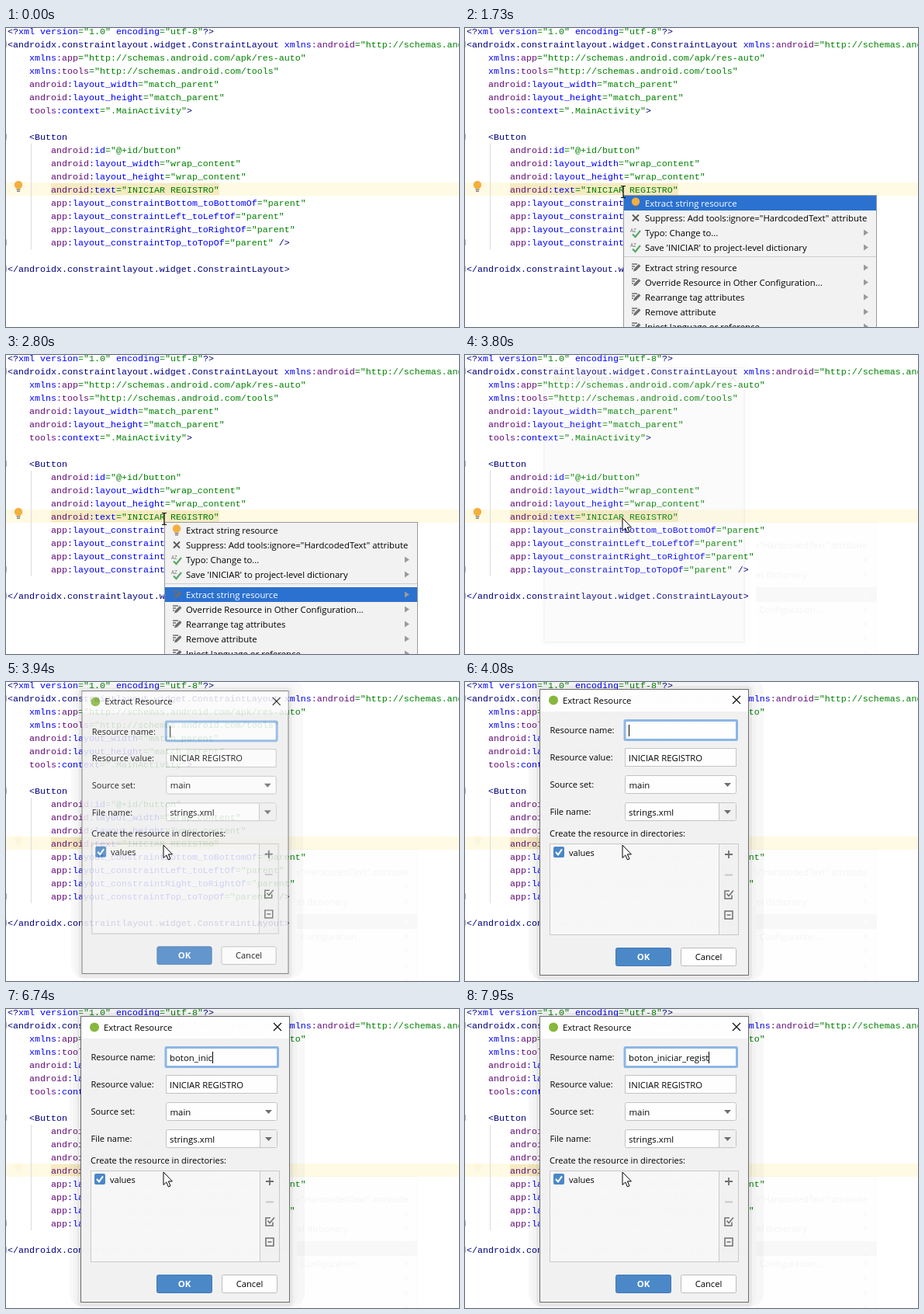
Animation of 584 by 385 pixels, one loop 8000 ms. Source, as an HTML page:

```html
<!DOCTYPE html>
<html lang="es">
<head>
<meta charset="utf-8">
<title>Extract string resource</title>
<style>
html, body { margin: 0; width: 100%; height: 100%; overflow: hidden; background: #fff; }
svg { display: block; }
text { white-space: pre; }
.code { font: 11.667px "Liberation Mono", "Courier New", monospace; }
.ui { font-family: "Open Sans", "Noto Sans", sans-serif; }
#ghost { filter: grayscale(1); }
</style>
</head>
<body>
<svg id="stage" width="584" height="385" viewBox="0 0 584 385"></svg>
<script>
const LOOP = 8000;
const stage = document.getElementById('stage');
const NAVY = '#000080', PURPLE = '#660e7a', BLUE = '#0000ff', GREEN = '#008000';

// --- markup helpers
const esc = s => s.replace(/&/g, '&amp;').replace(/</g, '&lt;').replace(/>/g, '&gt;');
const span = (s, fill) => `<tspan fill="${fill}">${esc(s)}</tspan>`;
const rect = (x, y, w, h, fill, more = '') =>
  `<rect x="${x}" y="${y}" width="${w}" height="${h}" fill="${fill}" ${more}/>`;
const line = (d, stroke, w = 1, more = '') =>
  `<path d="${d}" fill="none" stroke="${stroke}" stroke-width="${w}" ${more}/>`;
const shape = (d, fill) => `<path d="${d}" fill="${fill}"/>`;
const label = (x, y, s, size = 11.1, more = '') =>
  `<text class="ui" x="${x}" y="${y}" font-size="${size}" ${more}>${esc(s)}</text>`;
const box = (x, y, w, h, fill, stroke, r = 0) =>
  rect(x + .5, y + .5, w - 1, h - 1, fill, `stroke="${stroke}" rx="${r}"`);

// --- editor
const lines = [
  [0, '<?xml version="1.0" encoding="utf-8"?>'],
  [0, '<androidx.constraintlayout.widget.ConstraintLayout xmlns:android="http://schemas.android.com/apk/res/android"'],
  [4, 'xmlns:app="http://schemas.android.com/apk/res-auto"'],
  [4, 'xmlns:tools="http://schemas.android.com/tools"'],
  [4, 'android:layout_width="match_parent"'],
  [4, 'android:layout_height="match_parent"'],
  [4, 'tools:context=".MainActivity">'],
  [0, ''],
  [4, '<Button'],
  [8, 'android:id="@+id/button"'],
  [8, 'android:layout_width="wrap_content"'],
  [8, 'android:layout_height="wrap_content"'],
  [8, 'android:text="INICIAR REGISTRO"'],
  [8, 'app:layout_constraintBottom_toBottomOf="parent"'],
  [8, 'app:layout_constraintLeft_toLeftOf="parent"'],
  [8, 'app:layout_constraintRight_toRightOf="parent"'],
  [8, 'app:layout_constraintTop_toTopOf="parent" />'],
  [0, ''],
  [0, '</androidx.constraintlayout.widget.ConstraintLayout>']
];

function paint(s) {
  const parts = s.match(/="[^"]*"|xmlns|<\?|\?>|:\w+|<\/?[\w.]+|\/?>|\w+|\s+|./g) || [];
  let prev = '';
  return parts.map(p => {
    let fill = BLUE;
    if (p[0] === '=') fill = GREEN;
    else if (/^[<>\/?]/.test(p)) fill = NAVY;
    else if (p[0] === ':') fill = prev === 'xmlns' ? PURPLE : BLUE;
    else if (/^(android|app|tools)$/.test(p)) fill = PURPLE;
    prev = p;
    return span(p, fill);
  }).join('');
}

const codeText = lines.map(([indent, s], i) =>
  `<text class="code" x="${2 + indent * 7}" y="${8 + 17 * i}">${paint(s)}</text>`).join('');
const folds = [21, 140, 276, 310].map(y => line(`M0 ${y - 3.5}h.5v7h-.5`, '#b0b0b0')).join('');

const bulb = (x, y) =>
  `<circle cx="${x}" cy="${y - 2}" r="5.2" fill="#f4af3d"/>` +
  rect(x - 2.5, y + 3.5, 5, 1.2, '#6e6e6e') + rect(x - 2, y + 5.7, 4, 1.2, '#6e6e6e');

// --- popup menu
const check = (x, y) => label(x - 7, y - 1, 'AZ', 6.5, 'fill="#6e6e6e"') +
  line(`M${x - 4} ${y + 2}l3.5 3.5l6.5 -8`, '#59a869', 2.2);
const pencil = (x, y) =>
  line(`M${x - 5} ${y - 4.5}h7M${x - 5} ${y - 1.5}h4M${x - 5} ${y + 1.5}h2`, '#6e6e6e', 1.3) +
  shape(`M${x - 3} ${y + 5}l1 -3.5l6 -6l2.5 2.5l-6 6z`, '#6e6e6e');
const cross = (x, y) =>
  line(`M${x - 4} ${y - 4}l8 8m0 -8l-8 8`, '#595959', 1.8);

const items = [
  ['Extract string resource', bulb],
  ['Suppress: Add tools:ignore="HardcodedText" attribute', cross],
  ['Typo: Change to...', check],
  ["Save 'INICIAR' to project-level dictionary", check],
  ['Extract string resource', pencil],
  ['Override Resource in Other Configuration...', pencil],
  ['Rearrange tag attributes', pencil],
  ['Remove attribute', pencil],
  ['Inject language or reference', pencil]
];
const rowTop = i => i < 4 ? 216 + 19 * i : 223 + 19 * i;
const menu = box(204, 215, 327, 190, '#f2f2f2', '#9a9a9a') +
  line('M205 294.5h325', '#cdcdcd') +
  rect(205, 216, 325, 19, '#2b71cf', 'id="pick"') +
  items.map(([s, icon], i) => {
    const y = rowTop(i) + 9.5;
    return icon(220, y) + label(232, y + 4.2, s, 11.35, 'data-row') +
      (i > 1 ? shape(`M514 ${y - 4}l6 4l-6 4z`, '#9a9a9a') : '');
  }).join('');

// --- dialog
const arrowDown = (x, y) => shape(`M${x - 4.5} ${y - 2}h9l-4.5 5z`, '#6e6e6e');
const controls =
  label(109.5, 66.3, 'Resource name:') + label(109.5, 101.3, 'Resource value:') +
  label(109.5, 136.3, 'Source set:') + label(109.5, 171.3, 'File name:') +
  label(109, 199.3, 'Create the resource in directories:') +
  rect(206, 49.5, 144.5, 25, '#fff', 'stroke="#8bb6e6" stroke-width="3" rx="1"') +
  `<text class="ui" id="name" x="211" y="66.5" font-size="11.4"></text>` +
  rect(211, 55, 1, 15, '#000', 'id="caret"') +
  box(206, 85, 144, 24, '#fff', '#c4c4c4') + label(211, 101.5, 'INICIAR REGISTRO', 11.3) +
  box(206, 120, 144, 24, '#fff', '#c4c4c4', 2) + label(211.5, 136.5, 'main', 11.4) + arrowDown(338.5, 132) +
  box(206, 155, 144, 24, '#fff', '#c4c4c4', 2) + label(211, 171.5, 'strings.xml', 11.4) +
  rect(328, 156, 21, 22, '#f2f2f2') + line('M327.5 156v22', '#c4c4c4') + arrowDown(338.5, 167) +
  box(109, 208, 244, 118, '#f2f2f2', '#c9c9c9') +
  box(109, 208, 219, 118, '#f8f8f8', '#c9c9c9') +
  rect(114, 212, 14, 14, '#4a87c8', 'rx="2"') + line('M117 219l3 3.3l5 -7', '#fff', 2) +
  label(134, 223.5, 'values') +
  line('M340 217v10m-5 -5h10', '#6e6e6e', 1.8) + line('M335 248.5h10', '#c2c2c2', 1.8) +
  line('M344 274.5v4.5h-9v-10h6M337.5 272.5l2.5 3l6 -7', '#6e6e6e', 1.5) +
  line('M335 295h10v10h-10zM337.5 300h5', '#6e6e6e', 1.5) +
  box(194, 342, 72, 24, '#4a87c8', '#3f78b4', 2) +
  label(230, 358.3, 'OK', 11.4, 'fill="#fff" font-weight="700" text-anchor="middle"') +
  box(278, 342, 72, 24, '#fff', '#bcbcbc', 2) +
  label(314, 358.2, 'Cancel', 11.2, 'text-anchor="middle"');

const dialog =
  `<g id="shade">` +
  rect(82, -6, 303, 390, '#000', 'rx="18" opacity=".03"') +
  rect(87, 0, 288, 385, '#000', 'rx="12" opacity=".02"') +
  rect(92, 5, 278, 378, '#000', 'rx="6" opacity=".05"') + `</g>` +
  `<g id="panel">` +
  box(96, 9, 270, 369, '#f2f2f2', '#6a6a6a') +
  rect(97, 10, 268, 28, '#fff') +
  `<circle cx="114" cy="23.5" r="6" fill="#86b83c"/>` +
  label(126, 27.6, 'Extract Resource', 11.4) +
  line('M345 18l10 10m0 -10l-10 10', '#000', 1.1) +
  `<g id="controls">${controls}</g></g>`;

stage.innerHTML =
  `<defs><clipPath id="right"><rect x="375" y="200" width="160" height="185"/></clipPath></defs>` +
  rect(0, 0, 584, 385, '#fff') +
  rect(0, 199, 584, 17, '#fffae3') +
  rect(58, 200, 217, 15, '#f5eac1') + folds +
  line('M32.5 149v136', '#dcdcdc') + codeText +
  `<g id="bulb">${bulb(16, 204)}</g>` +
  rect(204, 199, 1.5, 17, '#000', 'id="mark"') +
  `<g id="ghost" clip-path="url(#right)" opacity=".04"><use href="#menu"/></g>` +
  `<g id="popup"><g id="menu">${menu}</g></g>` +
  `<g id="dialog">${dialog}</g>` +
  `<g id="beam">${line('M-3 -7.5h2.2l.8 .8l.8 -.8h2.2M0 -7v14M-3 7.5h2.2l.8 -.8l.8 .8h2.2', '#000', 1.2)}</g>` +
  `<path id="arrow" d="M203 210v16.5l3.8 -3.6l2.6 6l2.6 -1.1l-2.6 -5.9h5z" fill="#fff" stroke="#000"/>`;

const el = id => document.getElementById(id);
const show = (id, on) => el(id).setAttribute('display', on ? 'inline' : 'none');
const rows = [...stage.querySelectorAll('[data-row]')];
const count = (times, t) => times.filter(v => t >= v).length;

// --- timing
const moves = [60, 130, 200, 270, 350, 420];
const picks = [2340, 2500, 2640, 2800];
// start, opacity, scale
const opens = [[3800, .1, .96], [3880, .5, .977], [3940, .84, .989], [4020, .95, .996], [4080, .99, 1]];
const typed = 'boton_iniciar_regist';
const keys = [5150, 5290, 5450, 5590, 5670, 5980, 6360, 6440, 6580, 6740,
  6810, 6890, 6960, 7190, 7420, 7420, 7650, 7710, 7870, 7950];

function render(t) {
  const opened = t >= 3800;

  const step = count(moves, t);
  const k = 1 - Math.max(0, step - 1) / (moves.length - 1);
  const left = k * k;
  show('beam', step > 0 && !opened);
  el('beam').setAttribute('transform', `translate(${204 + 242 * left} ${211 + 76 * left})`);
  show('arrow', opened);

  show('bulb', t < 650 || t >= 1420);
  el('bulb').setAttribute('opacity', t >= 3880 ? .04 : 1);
  show('mark', t >= 650 && t < 1650);

  const pick = count(picks, t);
  show('popup', t >= 1650 && !opened);
  el('popup').setAttribute('opacity', t < 1730 ? .6 : 1);
  el('pick').setAttribute('y', rowTop(pick));
  rows.forEach((r, i) => r.setAttribute('fill', i === pick ? '#fff' : '#000'));
  show('ghost', opened);

  show('dialog', opened);
  if (!opened) return;
  const [start, alpha, scale] = opens[count(opens.map(o => o[0]), t) - 1];
  el('dialog').setAttribute('transform', `translate(231 193) scale(${scale}) translate(-231 -193)`);
  el('panel').setAttribute('opacity', alpha);
  el('shade').setAttribute('opacity', alpha);
  show('controls', start > 3800);

  const n = count(keys, t);
  const name = el('name');
  name.textContent = typed.slice(0, n);
  el('caret').setAttribute('x', n ? Math.round(211 + name.getComputedTextLength()) : 211);
  show('caret', t < 4320 || t >= 4840);
}

const begin = performance.now();
function tick() {
  render((performance.now() - begin) % LOOP);
  requestAnimationFrame(tick);
}
tick();
</script>
</body>
</html>
```
